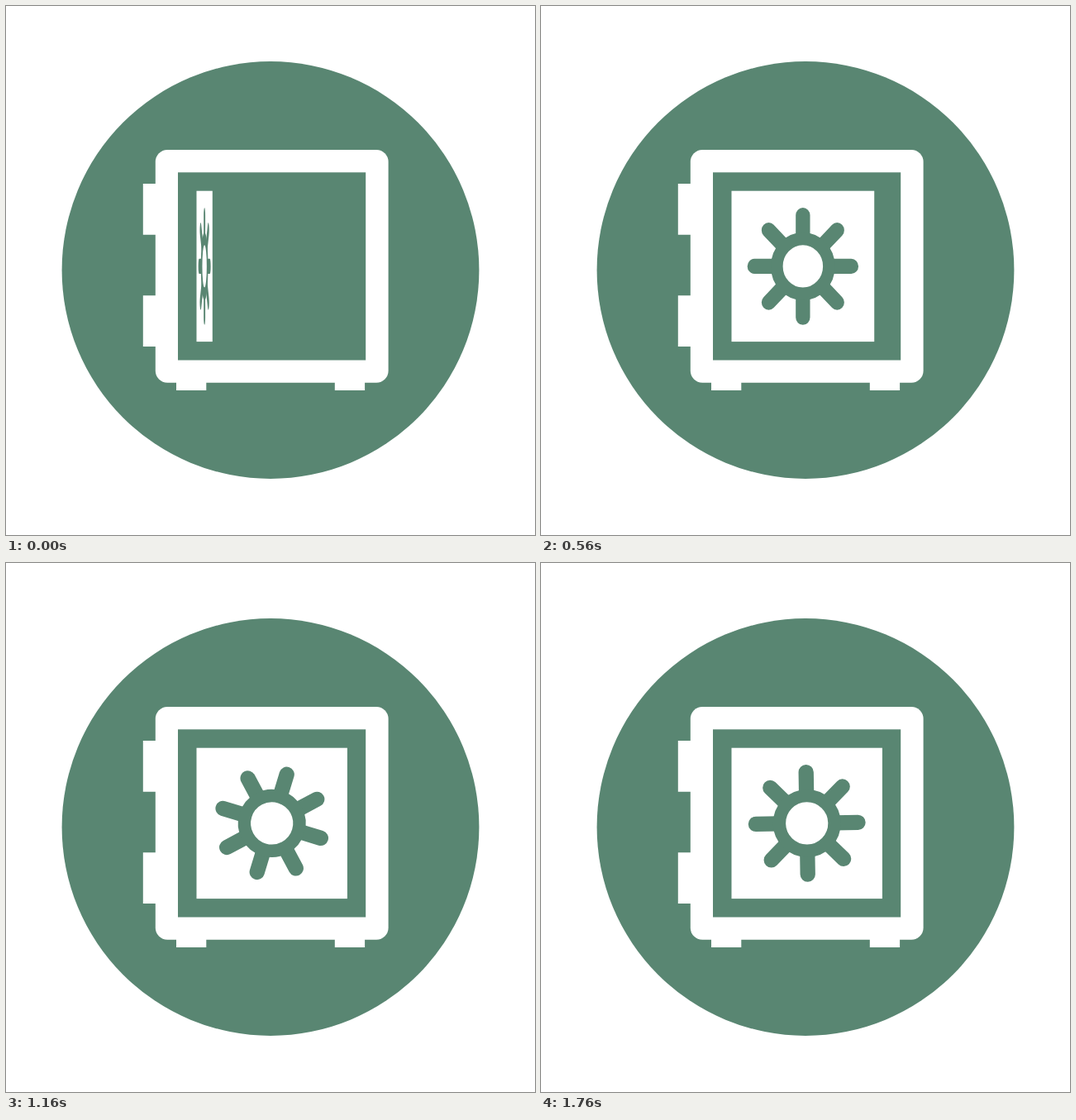
Recreate the animation shown at these times as an HTML page. Size 640 by 640 pixels, loop 2240 ms.

```html
<!DOCTYPE html>
<html lang="en">
<head>
<meta charset="utf-8">
<title>Safe</title>
<style>
  html, body { margin: 0; width: 100%; height: 100%; overflow: hidden; background: #fff; }
  svg { display: block; width: 100%; height: 100%; }
</style>
</head>
<body>
<svg viewBox="0 0 640 640" fill="#fff">
  <circle cx="320" cy="319.5" r="252.4" fill="#598672"/>
  <rect x="180.8" y="174" width="281.8" height="281.8" rx="14.5"/>
  <path d="M165.8 215h20v61.7h-20z M165.8 350.3h20v61.6h-20z M206 450h36.3v15H206z M397.8 450h36.3v15h-36.3z"/>
  <rect x="208" y="201.3" width="227.2" height="227.2" fill="#598672"/>
  <g id="door">
    <rect y="-91.2" width="182.4" height="182.4"/>
    <g id="wheel" stroke="#598672">
      <path id="spokes" stroke-width="18.3" stroke-linecap="round"/>
      <circle r="33.3" stroke-width="15.4"/>
    </g>
  </g>
</svg>
<script>
  const LOOP = 2240, STEP = 40, LAST_STEP = 44;
  const WHEEL_START = 18, WHEEL_SPEED = 13.81;
  const DOOR_START = 6.07, DOOR_SPEED = 4.655;
  const byId = id => document.getElementById(id);
  const door = byId('door'), wheel = byId('wheel');

  byId('spokes').setAttribute('d', Array.from({ length: 8 }, (_, i) => {
    const a = i * Math.PI / 4, x = Math.cos(a), y = Math.sin(a);
    return `M${x * 34} ${y * 34}L${x * 61.8} ${y * 61.8}`;
  }).join(''));

  // The door swings to face the viewer, then the wheel makes one turn.
  function draw(time) {
    const step = Math.min(LAST_STEP, Math.floor(time % LOOP / STEP));
    const swing = Math.min(90, DOOR_START + DOOR_SPEED * step);
    const turn = Math.max(0, step - WHEEL_START) * WHEEL_SPEED;
    const width = Math.sin(swing * Math.PI / 180);
    door.setAttribute('transform', `translate(230.5 314.9) scale(${width} 1)`);
    wheel.setAttribute('transform', `translate(91.2 0) rotate(${turn})`);
  }

  const start = performance.now();
  function tick() {
    draw(performance.now() - start);
    requestAnimationFrame(tick);
  }
  tick();
</script>
</body>
</html>
```
